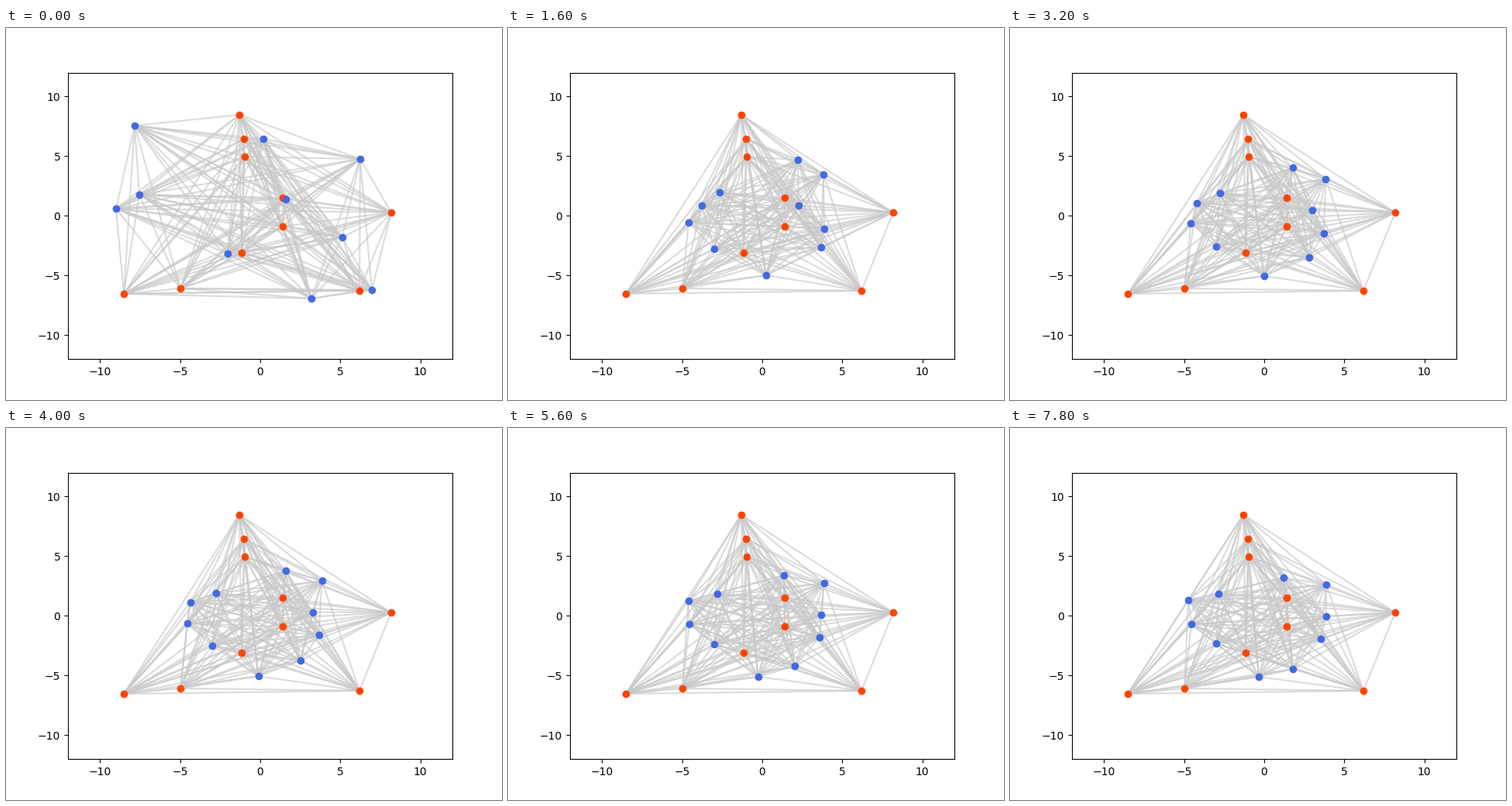
A matplotlib script that plays this animation: 640 by 480 pixels, repeating every 8 s.

```python
from itertools import combinations

import matplotlib.pyplot as plt
import numpy as np
from matplotlib.animation import FuncAnimation
from matplotlib.collections import LineCollection

FRAMES, STEP_MS = 40, 200
GATHER = 8  # steps of the fast first phase


def to_data(p):
    """Convert stage pixels to axis units."""
    x, y = np.moveaxis(np.asarray(p, float), -1, 0)
    return np.stack([(x - 80) / 496, (427.2 - y) / 369.6], axis=-1) * 24 - 12


fixed = to_data([(301, 112), (307, 143), (308, 166), (357, 219), (357, 256),
                 (497, 238), (304, 290), (152, 343), (225, 336), (456, 339)])

# Path of each mover: start, gathered, settled.
start, gathered, settled = to_data([
    [(166, 126), (273, 212), (269, 214)],
    [(172, 215), (250, 229), (230, 222)],
    [(142, 233), (233, 251), (234, 253)],
    [(286, 291), (266, 285), (266, 278)],
    [(332, 143), (374, 170), (353, 193)],
    [(361, 221), (375, 229), (408, 243)],
    [(457, 169), (407, 189), (408, 202)],
    [(434, 270), (408, 259), (401, 272)],
    [(394, 349), (333, 319), (321, 321)],
    [(472, 338), (404, 283), (365, 311)]]).swapaxes(0, 1)


def ease_out(t, bend):
    """Slow down towards the end; bend 0 is linear, 1 is quadratic."""
    return t + bend * t * (1 - t)


def movers_at(step):
    if step < GATHER:
        return start + (gathered - start) * ease_out(step / GATHER, 0.28)
    t = (step - GATHER) / (FRAMES - 1 - GATHER)
    return gathered + (settled - gathered) * ease_out(t, 1)


fig, ax = plt.subplots(figsize=(6.4, 4.8), dpi=100)
ax.set(xlim=(-12, 12), ylim=(-12, 12),
       xticks=range(-10, 11, 5), yticks=range(-10, 11, 5))

pairs = np.array(list(combinations(range(len(fixed) + len(start)), 2)))
edges = LineCollection([], colors="#c8c8c8", linewidths=1.5, alpha=0.65,
                       zorder=1)
ax.add_collection(edges)
ax.plot(*fixed.T, "o", color="orangered", zorder=3)
movers, = ax.plot([], [], "o", color="royalblue", zorder=4)


def draw(step):
    nodes = movers_at(step)
    movers.set_data(*nodes.T)
    edges.set_segments(np.concatenate([fixed, nodes])[pairs])
    return edges, movers


anim = FuncAnimation(fig, draw, frames=FRAMES, interval=STEP_MS,
                     repeat=True, repeat_delay=0)
plt.show()
```
